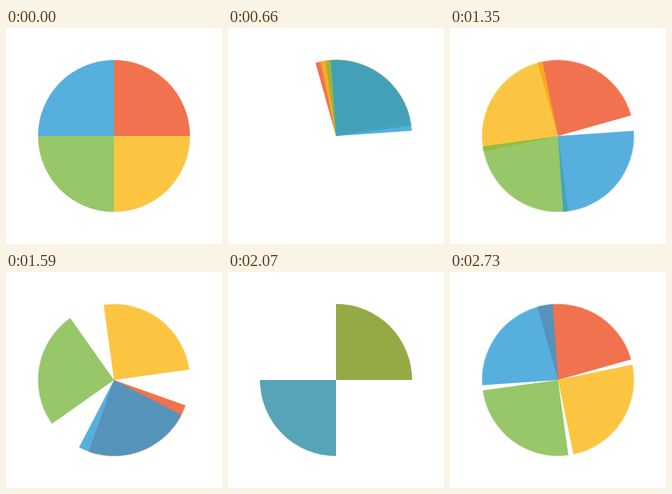
These frames come from a looping animation (270 px wide and 270 px high, 2760 ms). An HTML page:

```html
<!DOCTYPE html>
<html lang="en">
<head>
<meta charset="utf-8">
<title>Rotating quarters</title>
<style>
  html, body { margin: 0; width: 100%; height: 100%; overflow: hidden; background: #fff; }
  svg { display: block; width: 100%; height: 100%; }
  path { fill-opacity: .8; transform-origin: 0 0; }
</style>
</head>
<body>
<svg viewBox="0 0 270 270"><g id="pie" transform="translate(135 135)"></g></svg>
<script>
const LOOP = 2760, STEPS = 92, RADIUS = 95;

// Bottom to top; each quarter makes a whole number of turns per loop.
const quarters = [
  { color: 'rgb(238,79,36)',  start: 0,   turns: 4 },
  { color: 'rgb(250,183,19)', start: 90,  turns: 3 },
  { color: 'rgb(126,186,67)', start: 180, turns: 2 },
  { color: 'rgb(46,155,214)', start: 270, turns: 1 },
];

const pie = document.getElementById('pie');
for (const { color, start, turns } of quarters) {
  const wedge = document.createElementNS('http://www.w3.org/2000/svg', 'path');
  wedge.setAttribute('d', `M0 0V${-RADIUS}A${RADIUS} ${RADIUS} 0 0 1 ${RADIUS} 0Z`);
  wedge.setAttribute('fill', color);
  pie.append(wedge);
  // The small head start keeps samples clear of the step boundaries.
  wedge.animate(
    [start, start + 360 * turns].map(a => ({ transform: `rotate(${a}deg)` })),
    { duration: LOOP, delay: -2, iterations: Infinity, easing: `steps(${STEPS}, end)` }
  );
}
</script>
</body>
</html>
```
